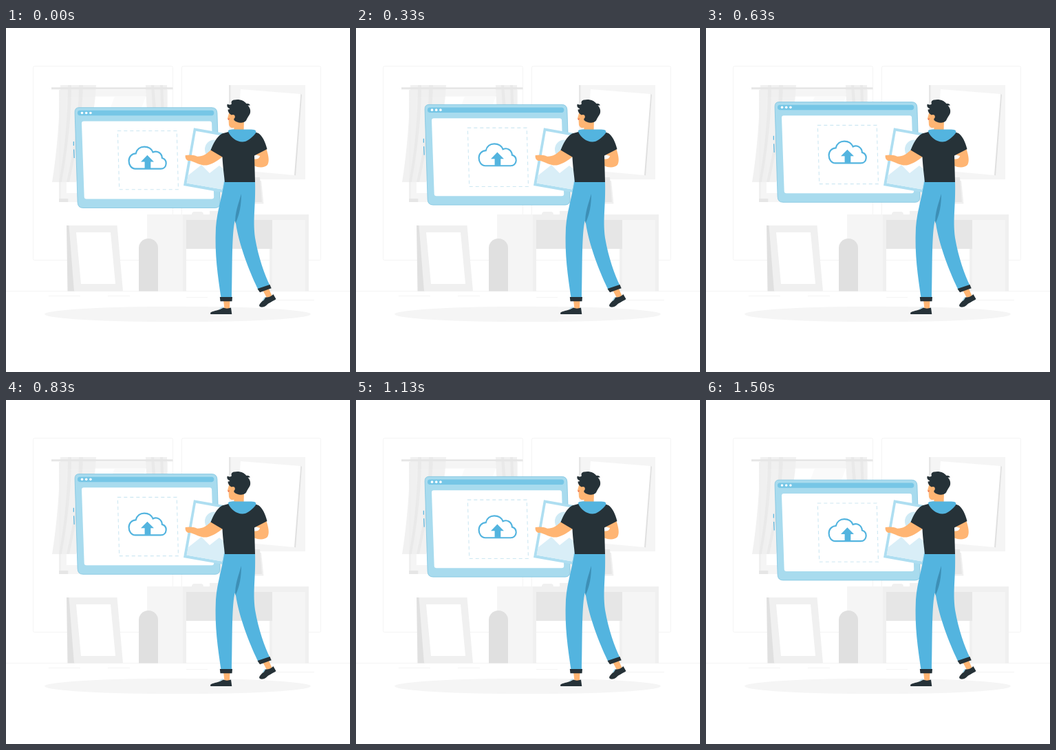
Write an HTML page that moves like this. It is 500 px wide and 500 px high and loops after 1.54 s.

```html
<!DOCTYPE html>
<html lang="en">
<head>
<meta charset="utf-8">
<title>Upload illustration</title>
<style>
  html, body { margin: 0; width: 100%; height: 100%; overflow: hidden; background: #fff; }
  svg { display: block; width: 100vw; height: 100vh; }
  .g1 { fill: #f5f5f5; } .g2 { fill: #f0f0f0; } .g3 { fill: #e6e6e6; } .g4 { fill: #e0e0e0; }
  .white { fill: #fff; } .blue { fill: #53b4df; } .dark { fill: #263238; } .skin { fill: #ffb573; }
  .line { fill: none; stroke: #f4f4f4; stroke-width: 1; }
</style>
</head>
<body>
<svg viewBox="0 0 500 500">
  <g id="room">
    <rect class="line" x="39.5" y="55.5" width="203" height="282" rx="2"/>
    <rect class="line" x="255.5" y="55.5" width="202" height="282" rx="2"/>
    <path class="line" d="M0 382.5H500M62 389.5H108M148 389.5H180M262 391.5H293M375 395.5H448" stroke="#f0f0f0"/>
    <ellipse class="g1" cx="249.5" cy="416" rx="193.5" ry="11.3"/>
  </g>

  <g id="window">
    <path class="g1" d="M77 90H235V253H77Z"/>
    <path class="white" d="M88 99.5H227V240H88Z"/>
    <path fill="#fafafa" d="M158 99.5H203L150 240H105Z"/>
    <path class="g2" d="M77 90H80V253H77ZM77 248H91V253H77Z"/>
    <path class="g3" d="M77 248H90V253H77Z"/>
    <path class="g2" d="M79 83H131C129 130 114 190 102 224H67C74 180 78 130 79 83Z" opacity=".9"/>
    <path class="g3" d="M90 83H95C95 135 88 185 81 224H77C85 180 90 130 90 83ZM106 83H112C111 130 101 185 92 224H88C99 175 106 130 106 83Z" opacity=".65"/>
    <path class="g2" d="M203 83H234C233 130 236 180 243 224H220C211 180 204 130 203 83Z"/>
    <path class="g3" d="M211 83H215L219 130H214ZM224 83H228L230 130H226Z" opacity=".7"/>
    <path class="g3" d="M66 86.3H242.5V89.2H66Z"/>
  </g>

  <g id="furniture">
    <path class="g1" d="M324 83H435V220H324Z"/>
    <path class="g3" d="M324 83H326.5V110H324Z"/>
    <path class="g4" d="M428 95.5L430 97L421 214.5L418 213Z"/>
    <path class="white" d="M341 89L428.3 96L419 214L332 206Z"/>
    <path class="g2" d="M310 222H371L374.5 255.5H310Z"/>
    <path class="g3" d="M361 217H369L372 253H361Z"/>
    <path class="g2" d="M270 271Q270 267 274 267H283Q287 267 287 271ZM296 266H308V271H296Z"/>
    <path class="g1" d="M205 271H257V382.5H205ZM387 279H435V382.5H387Z"/>
    <path class="g2" d="M257 271H440V382.5H435V279H262V382.5H257ZM383 321H387V382.5H383Z"/>
    <path class="g3" d="M262 279H387V321H262Z"/>
    <path class="g4" d="M193 382.5V320A14 14 0 0 1 221 320V382.5Z"/>
    <path class="g4" d="M88 287H94L100 382.5H89.5Z"/>
    <path class="g2" d="M91.5 287H161.5L170 382.5H99Z"/>
    <path class="white" d="M102 297H152L159 372H109Z"/>
  </g>

  <g id="tablet">
    <path d="M98.3 165.5V171.5M98.6 177L99.2 189.5" fill="none" stroke="#53b4df" stroke-width="1.2"/>
    <path d="M106 116.2H299Q306.6 116.2 306.9 124L311 254Q311.2 262 304 262H112Q104.4 262 104.1 254L100.1 123Q100 116.2 106 116.2Z" fill="#a8dbee" stroke="#74bfdd" stroke-width=".7"/>
    <path d="M107.5 120.4H299Q302.3 120.4 302.3 124T299 127.8H107.5Q104 127.8 104 124T107.5 120.4Z" fill="#76c6e6"/>
    <g class="white">
      <circle cx="110.5" cy="124" r="1.8"/><circle cx="116.7" cy="124" r="1.8"/><circle cx="122.9" cy="124" r="1.8"/>
    </g>
    <path class="white" d="M113 136H296Q299 136 299.1 139L302.2 246Q302.2 249 299 249H117Q113.8 249 113.7 246L110 139Q110 136 113 136Z"/>
    <path d="M162.3 150H248.2L250.5 235.3H164.7Z" fill="none" stroke="#cde7f2" stroke-width="1.1" stroke-dasharray="5 4"/>
    <path d="M188 205.1C182 205.1 178.6 199.5 178.6 193.7C178.6 187.5 183 183.3 188.7 183C190.2 176.8 195 173.2 201 173.2C207 173.2 211.6 176.2 213.6 181.1C220 178.2 226.5 182.5 226.9 189.5C230.8 190.5 232.8 194 232.7 197.5C232.4 202.4 229 205.1 225 205.1Z" fill="none" stroke="#53b4df" stroke-width="2.2"/>
    <path class="blue" d="M205.4 185.3L215 195H210.3V204.5H201.6V195H196Z"/>
  </g>

  <g id="picture">
    <path d="M273 145.2L332 155.6L317 239.4L258 229Z" fill="#aedef1"/>
    <path class="white" d="M276 149.8L328 159L314 234.5L262.7 225.5Z"/>
    <circle cx="303" cy="176.5" r="14" fill="#cfeaf5"/>
    <path d="M264.7 214.2L284 199L296 211L310 200L320 208L314 234.5L262.7 225.5Z" fill="#d9eef7"/>
  </g>

  <g id="man">
    <path class="skin" d="M316 395H325.5L325 408H317.5ZM373 381L381.5 378L387 390L379 392Z"/>
    <path class="dark" d="M297 415C297 411.5 305 411.5 311 409L316 406.5C319 408 323 408 327 406.5L328.3 416H298Q297 416 297 415Z"/>
    <path class="dark" d="M368 403.5C368.5 399.5 374 397 376.5 391.5C381 392 385 390.5 388.5 387L392.5 394C388 397.5 382 399 378 403.5C374 406.5 369 406.5 368 403.5Z"/>
    <path d="M310.5 408.5L315 405.5M373.5 396L376.5 391.5" fill="none" stroke="#a8dbee" stroke-width="1.4"/>
    <path class="blue" d="M317.5 223H362C363 262 358.5 275 362 305C367 334 376 359 383.5 374L367 381C356 359 341 322 335 290Q333 276 332 283C328 306 329 350 328 392H312.5C308 360 303 330 305 290C307 265 314 245 317.5 223Z"/>
    <path d="M342 241C338 255 332 270 333.5 284C340 270 342 256 342 241Z" fill="#3d8fb6"/>
    <path class="dark" d="M310.8 391H329L328.5 397.2H311.5ZM365.5 379L383.5 373L385.7 378.2L369 384.2Z"/>

    <path class="skin" d="M299 176C292 183 286 187 278 186.8C273 184 266 184 260.7 185C260 190 263 193.8 268 193C275 195 284 201 293 199.3C302 197 310 191 315 187Z"/>
    <path class="skin" d="M362 184L378.5 176C382 187 383 194 380 199C376 203.5 367 203 361 200.5V190.5C365 191 368.5 189.5 369 186Z"/>
    <path class="dark" d="M325 150.5L314 153.5C306 158 301 169 297.5 177.5L314.5 187.5C315 200 317 214 318 224H362L361 185.5L379.5 176C377 166 373 157 367 153L358 150Z"/>
    <path class="skin" d="M326 118L324 124L321.8 132L323.6 134L324 141C325 144.5 328 146 331.5 144.8L331 150H345.5L346 134Z"/>
    <path d="M322.3 132.2L325 131.2L323.8 133.8Z" fill="#e2574c"/>
    <path class="blue" d="M323 150.5C322.2 148.5 325 147.6 330 147.2C340 148 355 146.8 361 148C364 149 364 152 362 154C357 160 350 165.6 343.5 165.6C335 165.6 326 158.5 323 150.5Z"/>
    <path class="dark" d="M327 126C323.5 123.5 322.5 121 322.5 118.5Q324.5 118.6 325.5 117.5C321.5 116 320.5 112.5 322 110.5C324 112 326.5 112 328 110.3C326.5 107 329 104.6 332 104.6C338 103 346 105 349.3 110C351.5 109.5 353.8 110.3 355 112.3L351.5 112.8C354.5 115.5 356 120 354.8 124C353.5 127 350.5 131 349 134.5C345 139 337 138.8 331.5 134C331.5 130 330 127.5 327 126Z"/>
    <circle class="skin" cx="329.8" cy="129" r="3"/>
  </g>
</svg>
<script>
  const LOOP = 1540, STEPS = 37, STEP = 125 / 3, LIFT = 10;
  const tablet = document.getElementById('tablet');

  // Linear rise and fall, held per step at 24 steps a second.
  function lift(ms) {
    const t = Math.floor((ms % LOOP) / 10) * 10;
    const n = Math.floor((t + 4.9) / STEP);
    const phase = ((n + 1) % STEPS) / STEPS;
    return LIFT * (1 - Math.abs(2 * phase - 1));
  }

  const start = performance.now();
  function draw(now) {
    tablet.setAttribute('transform', `translate(0 ${-lift(Math.max(0, now - start))})`);
    requestAnimationFrame(draw);
  }
  draw(start);
</script>
</body>
</html>
```
